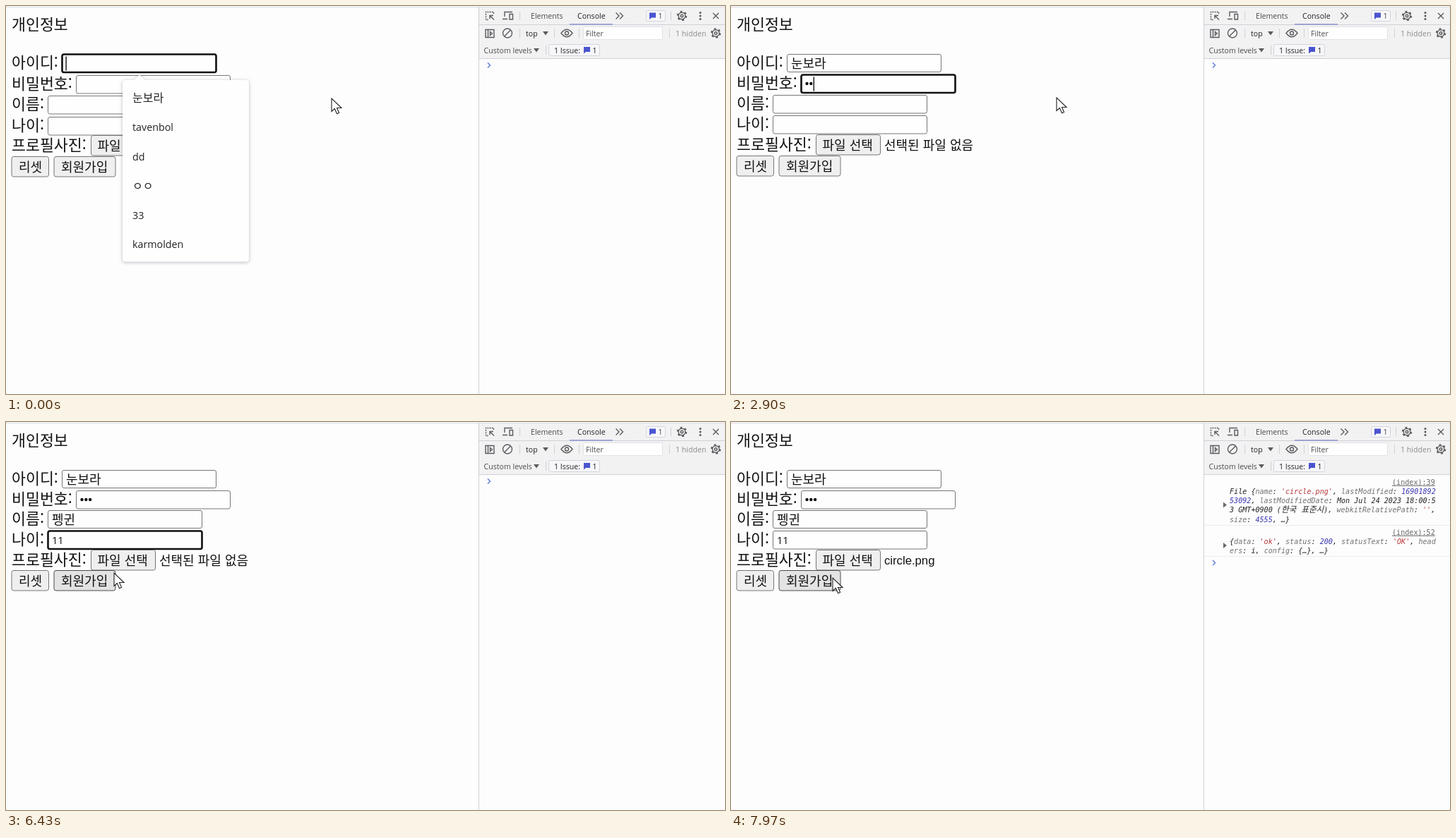
Recreate the animation shown at these times as an HTML page. Size 1018 by 550 pixels, loop 8 s.

```html
<!DOCTYPE html>
<html lang="ko">
<head>
<meta charset="utf-8">
<title>개인정보</title>
<style>
html, body { margin: 0; width: 100%; height: 100%; overflow: hidden; background: #fdfdfd; }
svg { display: block; }
text { white-space: pre; }
.ko { font: 300 18px "Noto Sans CJK KR", "Noto Sans CJK JP", sans-serif; fill: #111; }
.label { font-size: 21.7px; }
.num { font: 14.6px "Open Sans", sans-serif; fill: #111; }
.file { font: 16.7px "Liberation Sans", Arial, sans-serif; fill: #111; }
.item { font: 14.3px "Open Sans", "Noto Sans CJK KR", sans-serif; fill: #222; }
.item.han { font: 300 16px "Noto Sans CJK KR", sans-serif; }
.ui { font: 10.6px "Open Sans", sans-serif; fill: #4c4c50; }
.dark { fill: #222; }
.dim { fill: #8c8c8c; }
.log { font: italic 10.1px "DejaVu Sans Mono", "Noto Sans CJK KR", monospace; fill: #222; }
.log .k { fill: #707070; }
.log .s { fill: #b8383a; }
.log .n { fill: #3a34b0; }
.log .h { font-size: 11.6px; }
.src { font-style: normal; fill: #666; text-decoration: underline; }
.icon { fill: none; stroke: #5b5b5f; stroke-width: 1.4; }
.sep { stroke: #d0d0d8; }
.btn { fill: #efefef; stroke: #767676; }
.btn.hover { fill: #e3e3e3; stroke: #4a4a4a; }
.box { fill: #fefefe; stroke: #767676; }
.box.focus { stroke: #101010; stroke-width: 2.6; }
.pop { filter: drop-shadow(0 1px 2.5px rgba(40, 40, 70, .32)); }
#dialog { filter: drop-shadow(0 19px 18px rgba(0, 0, 0, .42)); }
</style>
</head>
<body>
<svg width="1018" height="550" viewBox="0 0 1018 550">
  <defs>
    <g id="gear" class="icon">
      <circle r="4.8"/>
      <circle r="6.2" stroke-width="2" stroke-dasharray="2.8 3.69"/>
      <circle r="1.8"/>
    </g>
    <path id="chat" d="M0 0H9V7H3L0 9.5Z" fill="#4a55cf"/>
  </defs>
  <rect width="1018" height="550" fill="#fdfdfd"/>

  <text class="ko label" x="8" y="25.5">개인정보</text>
  <g id="rows"></g>
  <g id="fileRow">
    <text class="ko label" x="8" y="14">프로필사진:</text>
    <rect class="btn" id="pick" x="120.5" y=".5" width="91" height="28.5" rx="3"/>
    <text class="ko" x="129.5" y="15">파일 선택</text>
    <text class="ko" id="noFile" x="217" y="15">선택된 파일 없음</text>
    <text class="file" id="chosen" x="217" y="15">circle.png</text>
  </g>
  <g id="buttons">
    <rect class="btn" id="reset" x="8" y=".5" width="52.5" height="28.5" rx="3"/>
    <text class="ko" x="18" y="15">리셋</text>
    <rect class="btn" id="join" x="68" y=".5" width="87" height="28.5" rx="3"/>
    <text class="ko" x="78" y="15">회원가입</text>
  </g>
  <rect id="under" y="90.5" width="17" height="1.2" fill="#111"/>
  <rect id="caret" width="1.4" height="20" fill="#111"/>

  <g id="devtools">
    <rect x="669" y="1" width="349" height="73.5" fill="#f2f2f3"/>
    <path class="sep" d="M670 26.5H1018M670 74.5H1018M669.5 1V550"/>
    <path d="M798 26H859" stroke="#8792cf" stroke-width="1.4"/>
    <path class="sep" d="M727.5 8V20M941.5 8V20M727.5 32V45M776.5 32V45M811.5 32V45M939.5 32V45M764.5 56V69"/>
    <g class="icon">
      <path d="M690.5 11V8.5H679.5V19.5H683" stroke-dasharray="2 1.2"/>
      <path d="M685 13.5L691 19.5M685 18V13.5H690"/>
      <path d="M706 15V8.500H717M703 18.500H710M713 11.500H717.500V19H713Z"/>
      <path d="M863.500 9.500L868 14L863.500 18.500M869 9.500L873.500 14L869 18.500"/>
      <path d="M1001 10L1009 18M1009 10L1001 18"/>
      <path d="M679 33.500H691V44.500H679ZM682.500 33.500V44.500M685.500 36.500L688.500 39L685.500 41.500Z"/>
      <circle cx="710" cy="38.500" r="6.500"/>
      <path d="M714.500 34L705.500 43"/>
      <path d="M786 38.500Q794 28 802 38.500Q794 49 786 38.500Z"/>
      <circle cx="794" cy="38.500" r="2.500"/>
    </g>
    <g fill="#5b5b5f">
      <circle cx="983" cy="9.500" r="1.500"/>
      <circle cx="983" cy="14" r="1.500"/>
      <circle cx="983" cy="18.500" r="1.500"/>
      <path d="M760 36H768L764 41.500ZM747 60H755L751 65.500Z"/>
    </g>
    <use href="#gear" x="957" y="14"/>
    <use href="#gear" x="1005" y="38.500"/>
    <g fill="#f7f7f9" stroke="#d3d3dc">
      <rect x="906.5" y="6.500" width="27" height="15" rx="2"/>
      <rect x="768.500" y="54.500" width="72" height="16" rx="2"/>
      <rect x="817.500" y="29.500" width="112" height="18" rx="2" fill="#fefefe" stroke="#e2e2e6"/>
    </g>
    <use href="#chat" x="911" y="9.500"/>
    <use href="#chat" x="818" y="58"/>
    <g class="ui">
      <text x="743" y="14">Elements</text>
      <text class="dark" x="809" y="14">Console</text>
      <text x="923.500" y="14.500">1</text>
      <text class="dark" x="736" y="39">top</text>
      <text x="821" y="39.500">Filter</text>
      <text class="dim" x="948" y="39">1 hidden</text>
      <text x="676.500" y="63">Custom levels</text>
      <text class="dark" x="776" y="63">1 Issue:</text>
      <text class="dark" x="830.500" y="63">1</text>
    </g>
  </g>

  <g id="log1" class="log">
    <text class="src" x="936" y="85">(index):39</text>
    <path d="M697 113.500V121.500L702 117.500Z" fill="#6b6b6b"/>
    <text x="706" y="98">File {<tspan class="k">name</tspan>: <tspan class="s">'circle.png'</tspan>, <tspan class="k">lastModified</tspan>: <tspan class="n">16901892</tspan></text>
    <text x="706" y="111.300"><tspan class="n">53092</tspan>, <tspan class="k">lastModifiedDate</tspan>: Mon Jul 24 2023 18:00:5</text>
    <text x="706" y="124.600">3 GMT+0900 (<tspan class="h">한국 표준시</tspan>), <tspan class="k">webkitRelativePath</tspan>: <tspan class="s">''</tspan>,</text>
    <text x="706" y="138"><tspan class="k">size</tspan>: <tspan class="n">4555</tspan>, …}</text>
    <path d="M670 146.500H1018" stroke="#ececf0"/>
  </g>
  <g id="log2" class="log">
    <text class="src" x="936" y="156">(index):52</text>
    <path d="M697 171V179L702 175Z" fill="#6b6b6b"/>
    <text x="706" y="169">{<tspan class="k">data</tspan>: <tspan class="s">'ok'</tspan>, <tspan class="k">status</tspan>: <tspan class="n">200</tspan>, <tspan class="k">statusText</tspan>: <tspan class="s">'OK'</tspan>, <tspan class="k">head</tspan></text>
    <text x="706" y="182.500"><tspan class="k">ers</tspan>: i, <tspan class="k">config</tspan>: {…}, …}</text>
    <path d="M670 190.500H1018" stroke="#ececf0"/>
  </g>
  <path id="prompt" d="M682 -3.500L685.500 0L682 3.500" fill="none" stroke="#5a78d8" stroke-width="1.400"/>
  <path d="M0 1.500H1018" stroke="#dcdce0"/>

  <g id="lists"></g>

  <g id="dialog">
    <rect x="13" y="-30" width="792" height="469" rx="8" fill="#fdfdfd" stroke="#9a9a9a"/>
    <path d="M13.500 341H804.500V431Q804.500 438.500 797 438.500H21Q13.500 438.500 13.500 431Z" fill="#eeeeef"/>
    <path d="M169 27H188V341H169ZM786 46H804.500V322H786Z" fill="#eeeeef"/>
    <path d="M173 61H184V196H173ZM790 46H801V93H790Z" fill="#828282"/>
    <path d="M158 372H238V390H158ZM244 370H560.500V393H244ZM574 370H785V393H574ZM574 398H673V428H574ZM686 398H785V428H686ZM785 420H804.500V431Q804.500 438 797 438H785Z" fill="#fdfdfd"/>
  </g>
  <path id="cursor" d="M0 0V18.500L4.300 14.500L7.500 21.800L10.600 20.400L7.500 13.500H14Z" fill="#fff" stroke="#222" stroke-width="1.100"/>
</svg>
<script>
const LOOP = 8000, GLYPH = 16.6;
const $ = id => document.getElementById(id);

function add(parent, tag, attrs, text = '') {
  const el = document.createElementNS('http://www.w3.org/2000/svg', tag);
  for (const k in attrs) el.setAttribute(k, attrs[k]);
  el.textContent = text;
  return parent.appendChild(el);
}

// Each field: label, left edge, label centre, focus span, text style and [time, value] keystrokes
const fields = [
  { label: '아이디:', x: 79, ly: 12, from: 0, to: 2250, cls: 'ko', step: GLYPH,
    keys: [[740, 'ㄴ'], [860, '누'], [990, '눈'], [1180, '눈ㅂ'], [1310, '눈보'], [1470, '눈볼'], [1640, '눈보라']] },
  { label: '비밀번호:', x: 99, ly: 11.5, from: 2250, to: 4300, cls: 'ko', step: 5.8,
    keys: [[2560, '•'], [2760, '••'], [3060, '•••']] },
  { label: '이름:', x: 59, ly: 12, from: 4300, to: 5360, cls: 'ko', step: GLYPH,
    keys: [[4620, 'ㅍ'], [4720, '페'], [4820, '펭'], [4940, '펭ㄱ'], [5030, '펭구'], [5100, '펭귀'], [5180, '펭귄']] },
  { label: '나이:', x: 59, ly: 11.5, from: 5360, to: 6690, cls: 'num', step: 8.4,
    keys: [[5520, '1'], [5660, '11']] }
];
for (const f of fields) {
  f.g = add($('rows'), 'g', {});
  add(f.g, 'text', { class: 'ko label', x: 8, y: f.ly }, f.label);
  f.box = add(f.g, 'rect', { x: f.x + .5, y: .5, width: 218, rx: 2.5 });
  f.text = add(f.g, 'text', { class: f.cls, x: f.x + 6, y: 13.5 });
  f.dots = [0, 1, 2].map(i =>
    add(f.g, 'circle', { cx: f.x + 8.5 + 5.8 * i, cy: 13, r: 2.2, fill: '#111' }));
}

// Suggestion popups
const lists = [
  { x: 165, y: 105, from: -1000, to: 720, items: ['눈보라', 'tavenbol', 'dd', 'ㅇㅇ', '33', 'karmolden'] },
  { x: 165, y: 105, from: 780, to: 1480, items: ['눈보라', '눈보람'] },
  { x: 144.500, y: 163, from: 4382, to: 4720, items: ['vpdrnls'] }
];
for (const l of lists) {
  const h = 41.5 * l.items.length + 8.5;
  l.cx = l.x + 89.5;
  l.cy = l.y + h / 2;
  l.g = add($('lists'), 'g', { class: 'pop' });
  add(l.g, 'path', {
    d: `M${l.x + 4} ${l.y}h12l8-7.500l8 7.500h143q4 0 4 4v${h - 8}q0 4-4 4h-171q-4 0-4-4v${8 - h}q0-4 4-4z`,
    fill: '#fefefe'
  });
  l.items.forEach((s, i) => add(l.g, 'text',
    { class: /[ㄱ-힣]/.test(s) ? 'item han' : 'item', x: l.x + 14, y: l.y + 25.5 + 41.5 * i }, s));
}

// y values are visual centres, so drop every baseline
document.querySelectorAll('text').forEach(el => el.setAttribute('dy', '.37em'));

const path = [
  [0, 461, 131], [700, 461, 130], [4200, 461, 130], [4400, 460, 143], [5750, 460, 143],
  [6250, 170, 226], [6430, 153, 214], [6650, 170, 196], [6780, 172, 196],
  [7100, 291, 152], [7250, 296, 150], [7580, 296, 150], [7850, 144, 221], [LOOP, 144, 221]
];

const clamp = v => Math.max(0, Math.min(1, v));
const fade = (t, from, to, ms) => Math.min(clamp((t - from) / ms), clamp((to - t) / ms));
const show = (el, on) => el.setAttribute('visibility', on ? 'visible' : 'hidden');
const move = (el, x, y) => el.setAttribute('transform', `translate(${x} ${y})`);

function pointer(t) {
  const i = path.findIndex(p => p[0] > t);
  const [t0, x0, y0] = path[i - 1], [t1, x1, y1] = path[i];
  const u = (t - t0) / (t1 - t0), e = u * u * (3 - 2 * u);
  return [x0 + (x1 - x0) * e, y0 + (y1 - y0) * e];
}

function zoom(el, cx, cy, a, amount) {
  const s = 1 - amount * (1 - a);
  show(el, a > 0);
  el.style.opacity = a;
  el.setAttribute('transform', `translate(${cx} ${cy}) scale(${s}) translate(${-cx} ${-cy})`);
}

function draw(t) {
  // Hangul input makes its row a pixel shorter
  const a = t >= fields[0].keys[0][0] ? 1 : 0, b = t >= fields[2].keys[0][0] ? 1 : 0;
  const tops = [68, 98 - a, 127 - a - b, 157 - 2 * a - b];
  const fileY = 183 - a - b, btnY = 213 - a - 2 * b;
  let caretOn = false;

  fields.forEach((f, i) => {
    const typed = f.keys.filter(k => k[0] <= t), [last, value] = typed[typed.length - 1] || [f.from, ''];
    const focus = t >= f.from && t < f.to, secret = i === 1;
    move(f.g, 0, tops[i]);
    f.box.setAttribute('class', focus ? 'box focus' : 'box');
    f.box.setAttribute('height', i % 2 === 0 && value ? 25 : 25.5);
    f.text.textContent = secret ? '' : value;
    f.dots.forEach((d, n) => show(d, secret && n < value.length));
    if (!focus) return;
    const end = f.x + 5.4 + f.step * value.length + (value ? .6 : 0);
    caretOn = (t - last) % 1060 < 530;
    move($('caret'), end, tops[i] + 3.5);
    const composing = f.step === GLYPH && value && t < f.to - 200;
    show($('under'), composing);
    move($('under'), end - 17, tops[i] - 68);
  });
  show($('caret'), caretOn);
  if (t >= 6690) show($('under'), false);

  move($('fileRow'), 0, fileY);
  move($('buttons'), 0, btnY);
  show($('noFile'), t < 7560);
  show($('chosen'), t >= 7560);

  for (const l of lists) zoom(l.g, l.cx, l.cy, fade(t, l.from, l.to, 120), .035);
  zoom($('dialog'), 409, 200, fade(t, 6800, 7620, 130), .05);

  const [x, y] = pointer(t), free = t < 6800 || t > 7600;
  const over = (l, r, top) => free && x >= l && x <= r && y >= top && y <= top + 29;
  move($('cursor'), x, y);
  $('pick').classList.toggle('hover', over(120, 212, fileY));
  $('reset').classList.toggle('hover', over(8, 61, btnY));
  $('join').classList.toggle('hover', over(68, 155, btnY));

  const logs = (t >= 7900) + (t >= 7935);
  show($('log1'), logs > 0);
  show($('log2'), logs > 1);
  move($('prompt'), 0, [84, 156, 199.5][logs]);
}

const start = performance.now();
function tick() {
  draw((performance.now() - start) % LOOP);
  requestAnimationFrame(tick);
}
tick();
</script>
</body>
</html>
```
